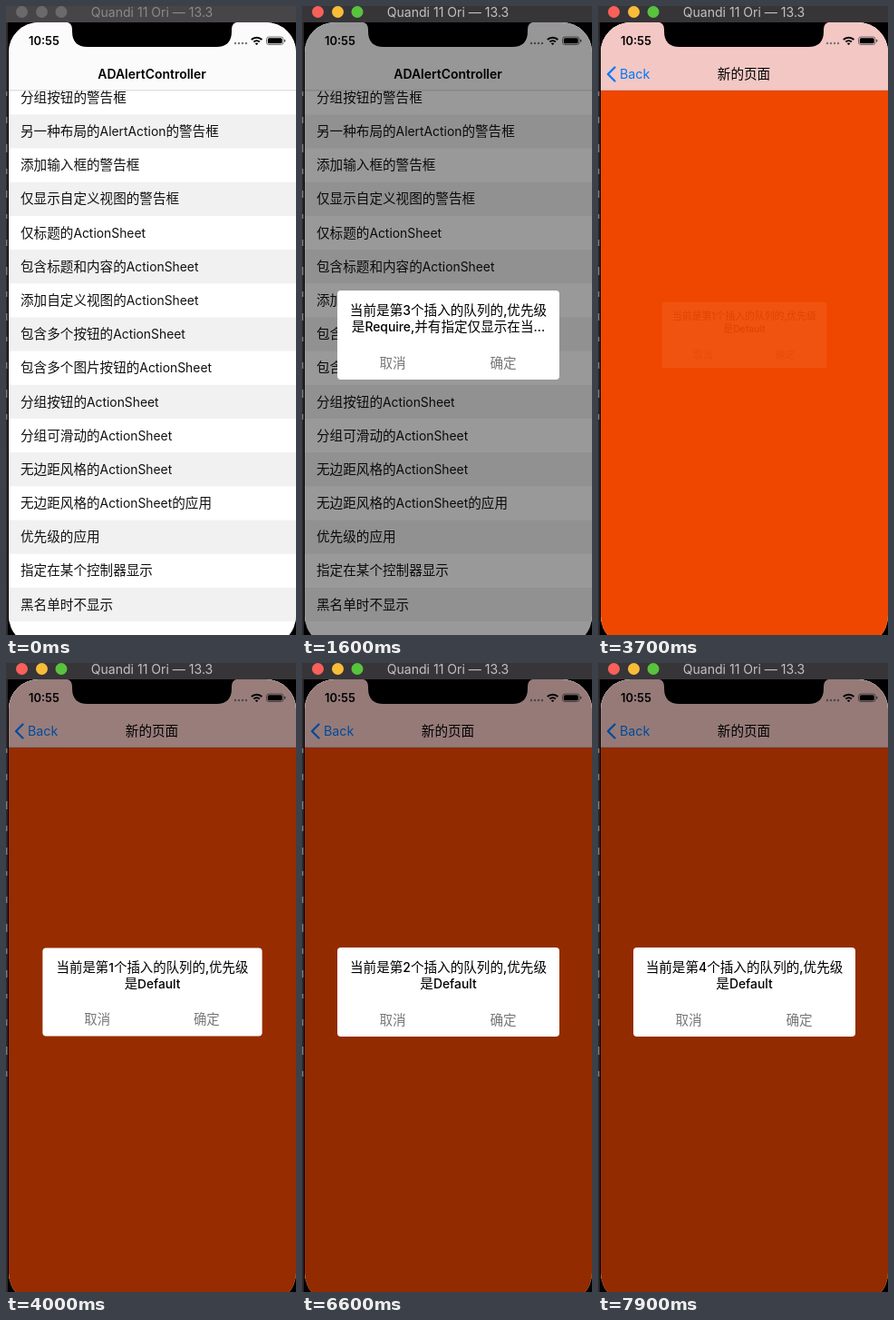
An HTML page that plays this animation: 320 px wide and 692 px high, repeating every 8 s.

```html
<!DOCTYPE html>
<html lang="zh">
<head>
<meta charset="utf-8">
<style>
html, body { margin: 0; width: 100%; height: 100%; overflow: hidden; background: #000; }
svg { display: block; width: 320px; height: 692px; font-family: Inter, "Noto Sans CJK SC", "Noto Sans CJK", sans-serif; }
</style>
</head>
<body>
<svg id="stage" viewBox="0 0 320 692">
  <defs>
    <clipPath id="screen"><rect x="3" y="18" width="317" height="686" rx="33"/></clipPath>
    <clipPath id="body"><rect x="3" y="93" width="317" height="611"/></clipPath>
    <linearGradient id="tint" gradientUnits="userSpaceOnUse" y1="0" y2="0">
      <stop stop-color="#f7cbc8" stop-opacity="0"/><stop offset="1" stop-color="#f7cbc8"/>
    </linearGradient>
  </defs>
  <rect width="320" height="692" fill="#000"/>
  <rect y="18" width="2" height="674" fill="#2c2a2d"/>
  <g id="specks" fill="#777"></g>
  <rect id="bar" width="320" height="18"/>
  <g id="lights"></g>
  <g id="caption"></g>
  <g clip-path="url(#screen)">
    <rect x="3" y="18" width="317" height="686" fill="#fff"/>
    <g clip-path="url(#body)">
      <g id="list"></g>
      <rect id="page" y="93" width="317" height="611" fill="#f54800"/>
    </g>
    <rect x="3" y="18" width="317" height="75" fill="#fbfbfb"/>
    <rect id="glow" x="3" y="18" width="317" height="75" fill="url(#tint)"/>
    <rect x="3" y="92.5" width="317" height=".8" fill="#000" opacity=".2"/>
    <g id="oldTitle"></g>
    <g id="newTitle"></g>
    <path id="chevron" d="M18.5 67.5L11 75l7.500 7.500" fill="none" stroke="#007aff" stroke-width="2.300" stroke-linecap="round" stroke-linejoin="round"/>
    <g id="back"></g>
    <g id="clock"></g>
    <g fill="#777"><circle cx="253" cy="41" r="1.200"/><circle cx="257" cy="41" r="1.200"/><circle cx="261" cy="41" r="1.200"/><circle cx="265" cy="41" r="1.200"/></g>
    <path d="M270.800 37a8.300 8.300 0 0 1 11.600 0M273.400 39.400a4.700 4.700 0 0 1 6.400 0" fill="none" stroke="#000" stroke-width="2"/>
    <path d="M274.800 41.200a2.800 2.800 0 0 1 3.600 0L276.600 43z"/>
    <rect x="287.500" y="34" width="18.500" height="8.500" rx="2.500" fill="none" stroke="#555" stroke-width=".8"/>
    <rect x="288.800" y="35.300" width="15.900" height="5.900" rx="1.500"/>
    <rect x="307" y="36.700" width="1.300" height="3" rx=".6" fill="#555"/>
    <rect id="dim" x="3" y="18" width="317" height="686"/>
    <path d="M65 17.500Q73 18 73 26V28Q73 45 90 45H232Q249 45 249 28V26Q249 18 257 17.500Z"/>
  </g>
  <g id="alert">
    <rect x="39" y="313" width="245" height="98" rx="4" fill="#fff"/>
    <g id="message"></g>
    <g id="buttons"></g>
  </g>
</svg>
<script>
const LOOP = 8000, FIRST_ROW = 100.8, ROW = 37.18, WIDTH = 317;
const rows = [
  '分组按钮的警告框', '另一种布局的AlertAction的警告框', '添加输入框的警告框', '仅显示自定义视图的警告框',
  '仅标题的ActionSheet', '包含标题和内容的ActionSheet', '添加自定义视图的ActionSheet', '包含多个按钮的ActionSheet',
  '包含多个图片按钮的ActionSheet', '分组按钮的ActionSheet', '分组可滑动的ActionSheet', '无边距风格的ActionSheet',
  '无边距风格的ActionSheet的应用', '优先级的应用', '指定在某个控制器显示', '黑名单时不显示'
];
// show / hide: start of the fade in and out
const alerts = [
  { n: 3, show: 1200, hide: 3300, level: ['是Require,并有指定仅显示在当...'] },
  { n: 1, show: 3650, hide: 5750 },
  { n: 2, show: 6100, hide: 6950 },
  { n: 4, show: 7400, hide: Infinity }
];

const $ = id => document.getElementById(id);
const set = (el, attrs) => { for (const k in attrs) el.setAttribute(k, attrs[k]); return el; };
const add = (parent, tag, attrs) =>
  parent.appendChild(set(document.createElementNS('http://www.w3.org/2000/svg', tag), attrs));
const smooth = u => { u = Math.max(0, Math.min(1, u)); return u * u * (3 - 2 * u); };

// Latin runs are set slightly smaller than the Chinese ones.
function write(parent, str, x, mid, { size = 14.6, weight = 400, fill = '#000', anchor = 'start' } = {}) {
  const el = add(parent, 'text', { x, y: mid + 5.1, fill, 'font-weight': weight, 'text-anchor': anchor });
  for (const run of str.match(/[\x00-\x7f—]+|[^\x00-\x7f—]+/g)) {
    const latin = run.charCodeAt(0) < 128;
    add(el, 'tspan', { 'font-size': latin ? size * 0.95 : size }).textContent = run;
  }
}

rows.forEach((label, i) => {
  const mid = FIRST_ROW + i * ROW;
  if (i % 2) add($('list'), 'rect', { x: 3, y: mid - ROW / 2, width: WIDTH, height: ROW, fill: '#f1f1f1' });
  write($('list'), label, 16, mid, { fill: '#111' });
});
for (let i = 0; i < 14; i++)
  add($('specks'), 'rect', { y: 94 + i * 27 + i * i % 5, width: 1.5, height: 5 + i * 7 % 5 });
const lights = [17.5, 39.5, 61].map(cx => add($('lights'), 'circle', { cx, cy: 6.500, r: 6.500 }));
const middle = { anchor: 'middle' }, bold = { weight: 600, anchor: 'middle' };
write($('caption'), 'Quandi 11 Ori — 13.3', 161, 7, { size: 14.8, fill: 'currentColor', ...middle });
write($('oldTitle'), 'ADAlertController', 161, 74.5, { ...bold, size: 14.7 });
write($('newTitle'), '新的页面', 161, 74.5, { ...bold, weight: 500 });
write($('back'), 'Back', 24, 74.5, { fill: '#007aff', size: 15 });
write($('clock'), '10:55', 25, 37.5, { weight: 600, size: 13.6 });
write($('buttons'), '取消', 100, 392.5, { fill: '#777', ...middle });
write($('buttons'), '确定', 222, 392.5, { fill: '#777', ...middle });
for (const a of alerts) {
  a.el = add($('message'), 'g', {});
  write(a.el, `当前是第${a.n}个插入的队列的,优先级`, 161.5, 334.5, { ...bold, weight: 500 });
  write(a.el, a.level ? a.level[0] : '是Default', 161.5, 353, { ...bold, weight: 500 });
}

function drawWindow(t) {
  const active = t >= 500;
  set($('bar'), { fill: active ? '#373538' : '#474548' });
  set($('caption'), { color: active ? '#c4c0c4' : '#8b898b' });
  const colors = active ? ['#f9605a', '#f8bd38', '#58c33c'] : ['#6b696b', '#6b696b', '#6b696b'];
  lights.forEach((c, i) => set(c, { fill: colors[i] }));
}

function drawPush(t) {
  const p = smooth((t - 2760) / 500), edge = 3 + WIDTH * (1 - p);
  set($('list'), { transform: `translate(${-0.3 * WIDTH * p})` });
  set($('page'), { x: edge });
  set($('tint'), { x1: edge - 110 * (1 - p) - 60 * p, x2: edge + 80 * (1 - p) });
  set($('glow'), { opacity: Math.min(1, p * 3) });
  set($('oldTitle'), { transform: `translate(${-65 * p})`, opacity: Math.max(0, 1 - p * 1.15) });
  set($('newTitle'), { transform: `translate(${204 * (1 - p)})`, opacity: p });
  set($('chevron'), { opacity: p });
  set($('back'), { opacity: Math.max(0, p * 2 - 1) });
}

function drawAlert(t) {
  const now = alerts.findLast(a => t >= a.show) || alerts[0];
  const shown = smooth((t - now.show) / 400), left = 1 - smooth((t - now.hide) / 280);
  const scale = 0.73 + 0.27 * shown;
  for (const a of alerts) set(a.el, { visibility: a === now ? 'visible' : 'hidden' });
  set($('dim'), { opacity: 0.4 * shown * left });
  set($('alert'), {
    opacity: Math.min(1, shown * 1.4) * left,
    transform: `translate(161.5 362) scale(${scale}) translate(-161.5 -362)`
  });
}

const start = performance.now();
function frame() {
  const t = (performance.now() - start) % LOOP;
  drawWindow(t);
  drawPush(t);
  drawAlert(t);
  requestAnimationFrame(frame);
}
frame();
</script>
</body>
</html>
```
